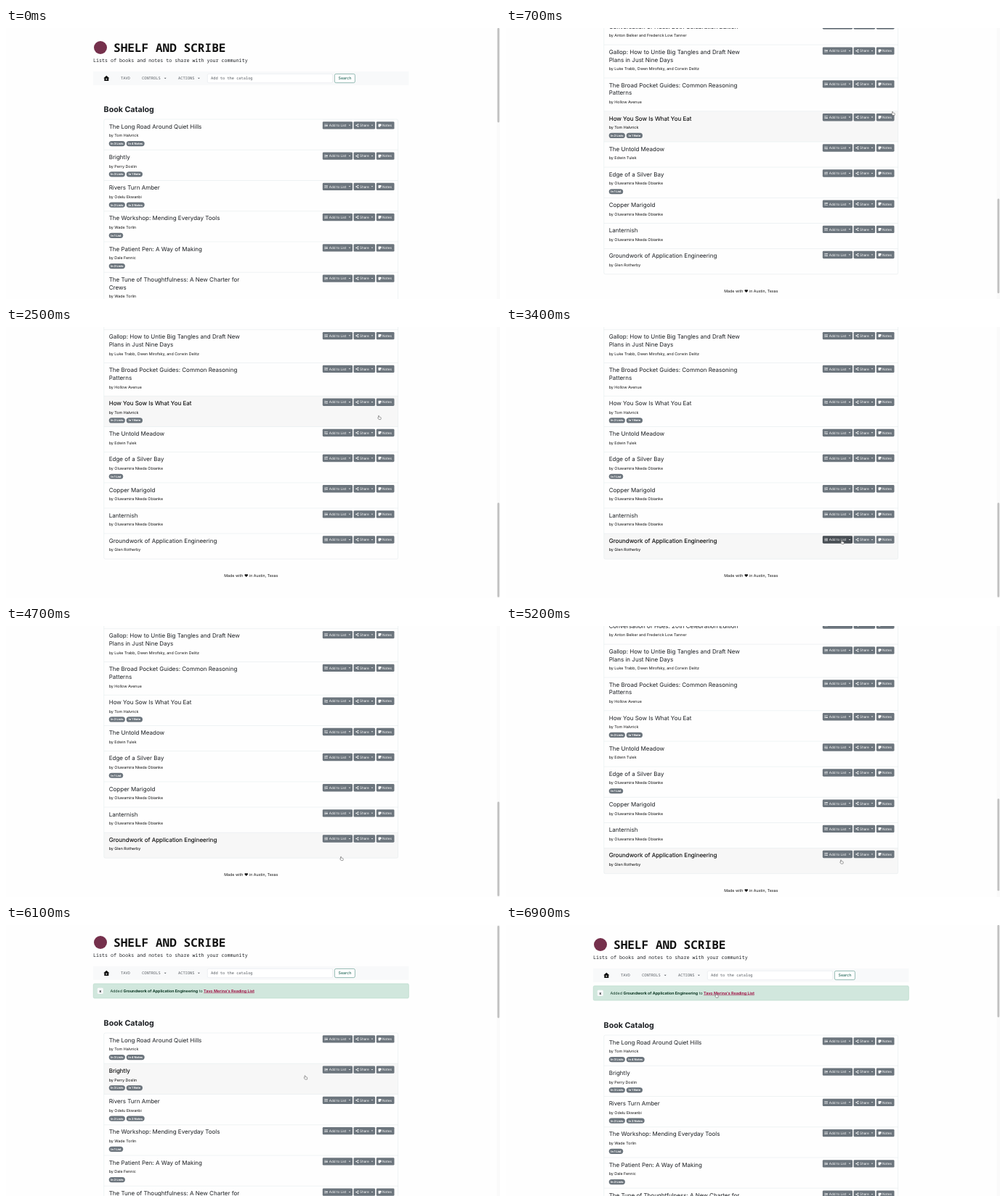
An HTML page that plays this animation: 680x374 px, repeating every 8 s.

```html
<!DOCTYPE html>
<html lang="en">
<head>
<meta charset="utf-8">
<title>Book Catalog</title>
<style>
html, body { margin: 0; width: 100%; height: 100%; overflow: hidden; background: #fefefe; }
svg { display: block; width: 100%; height: 100%; }
text { font-family: Inter, "DejaVu Sans", sans-serif; fill: #1c1f23; white-space: pre; text-rendering: geometricPrecision; }
.mono { font-family: "Noto Sans Mono", "DejaVu Sans Mono", monospace; }
.title { font-size: 8px; }
.by { font-size: 5.33px; fill: #111; }
.badge { font-size: 4px; font-weight: 700; fill: #fff; text-anchor: middle; }
.label { font-size: 4.67px; fill: #fff; }
.nav { font-size: 5.33px; fill: #555a60; }
.btn { fill: #6c757d; }
.btn.on { fill: #484e54; }
.bg { fill: none; }
.hover .bg { fill: #f7f7f7; }
.hover .title { fill: #000; stroke: #000; stroke-width: .07; }
.hover .by { fill: #000; }
.line { fill: none; stroke: #e4ebec; stroke-width: .6; }
</style>
</head>
<body>
<svg id="stage" viewBox="0 0 680 374" xmlns="http://www.w3.org/2000/svg">
  <defs>
    <g id="icoList" fill="#fff">
      <path d="M0 -1.9h1v1h-1zM0 -.5h1v1h-1zM0 .9h1v1h-1zM1.5 -1.7h2.8v.6h-2.8zM1.5 -.3h2.8v.6h-2.8zM1.5 1.1h2.8v.6h-2.8z"/>
    </g>
    <g id="icoShare" fill="#fff" stroke="#fff" stroke-width=".5">
      <path d="M3.2 -1.4L.9 0L3.2 1.4" fill="none"/>
      <circle cx="3.3" cy="-1.4" r=".6"/><circle cx=".9" cy="0" r=".6"/><circle cx="3.3" cy="1.4" r=".6"/>
    </g>
    <path id="icoNote" fill="#fff" d="M.4 -2h3.2q.4 0 .4 .4v2.1h-1.5v1.5h-2.1q-.4 0 -.4 -.4v-3.2q0 -.4 .4 -.4zM3 2v-1h1z"/>
  </defs>
  <g id="page">
    <circle cx="130" cy="27" r="9" fill="#75304c"/>
    <text class="mono" x="148" y="32.8" font-size="16.1" font-weight="600" style="fill:#111">SHELF AND SCRIBE</text>
    <text class="mono" x="120" y="47" font-size="6.7" font-weight="500">Lists of books and notes to share with your community</text>
    <rect x="120" y="60" width="434.5" height="18.7" fill="#f8f9fa"/>
    <path d="M138.3 65.8l4 3.5h-1v3.6h-6v-3.6h-1z" fill="#111"/>
    <rect x="137.5" y="69.8" width="1.6" height="1.6" fill="#f8f9fa"/>
    <text class="mono nav" x="158" y="71.4">TAVO</text>
    <text class="mono nav" x="187" y="71.4">CONTROLS</text>
    <text class="mono nav" x="237" y="71.4">ACTIONS</text>
    <path d="M217.7 68.8h3l-1.5 1.5zM263.9 68.8h3l-1.5 1.5z" fill="#555a60"/>
    <rect x="277.3" y="63.3" width="172.5" height="12.4" rx="2" fill="#fff" stroke="#dee2e6" stroke-width=".5"/>
    <text class="mono nav" x="282" y="71.4">Add to the catalog</text>
    <rect x="452.4" y="63.4" width="28" height="12.2" rx="2" fill="#fff" stroke="#4f9183" stroke-width=".6"/>
    <text x="466.4" y="71.4" font-size="5.33" font-weight="500" text-anchor="middle" style="fill:#24695a">Search</text>
    <g id="alert">
      <rect x="120.2" y="83.9" width="434.2" height="20.2" rx="1.8" fill="#d1e7dd" stroke="#a9d0bf" stroke-width=".5"/>
      <rect x="125.8" y="89.7" width="8" height="8.4" rx="1.5" fill="#f8f9fa"/>
      <text class="mono" x="129.8" y="95.7" font-size="5" font-weight="700" text-anchor="middle">x</text>
      <text x="143.4" y="95.6" font-size="5.33" style="fill:#0a3622">Added <tspan font-weight="700">Groundwork of Application Engineering</tspan> to <tspan font-weight="700" fill="#a01848" text-decoration="underline">Tavo Merina's Reading List</tspan></text>
    </g>
    <g id="content">
      <text x="134.6" y="115.6" font-size="10.67" font-weight="700">Book Catalog</text>
    </g>
  </g>
  <rect x="675.5" width="4.5" height="374" fill="#fafafa"/>
  <rect id="thumb" x="676.4" width="2.8" rx="1.4" fill="#c1c1c1"/>
  <path id="hand" d="M-1.3 -2.6q.7 -.4 .9 .3v1.4l1.9 .4q.9 .2 .8 1l-.4 2.1h-2.7l-1.4 -1.9q-.3 -.6 .3 -.7l.4 .3v-2.3q0 -.4 .2 -.6z" fill="#fff" stroke="#555" stroke-width=".55"/>
</svg>
<script>
const LOOP = 8000, STEP = 100, VIEW = 374, LIST_TOP = 126, ALERT_H = 26, PAGE_H = 1063.5;
const LEFT = 134.8, WIDTH = 404.8;
const ADD_AT = 4900;

// title lines split by "|", author, number of lists, number of notes
const books = [
  ["The Long Road Around Quiet Hills", "Tom Halvrick", 3, 4],
  ["Brightly", "Perry Doslin", 3, 1],
  ["Rivers Turn Amber", "Odelu Ekwanbi", 2, 2],
  ["The Workshop: Mending Everyday Tools", "Wade Torlin", 1],
  ["The Patient Pen: A Way of Making", "Dale Fennic", 2],
  ["The Tune of Thoughtfulness: A New Charter for|Crews", "Wade Torlin", 1],
  ["Clear Musing: The Big Atlas of Daily Puzzles", "Bernard Hollisk and Maureen Tadley", 3],
  ["Growing Crews: Methods for Supervision and|Workshop Planning", "Elaine Porter Wickson", 2],
  ["Wondering in Layers", "Rosetta K. Farlows", 1],
  ["Stewardship: Six Essays in Harbor Affairs", "Leonard Passwick", 1],
  ["Narrow and Boundless Yards", "Colin R. Dreve"],
  ["Hearing What Walls Won't: The Surprising Ways|We Find Answers", "Paul E. Vrint", 1],
  ["Conversation of Hues: 20th Celebration Edition", "Anton Belker and Frederick Low Tanner"],
  ["Gallop: How to Untie Big Tangles and Draft New|Plans in Just Nine Days", "Luke Trabb, Owen Mirofsky, and Corwin Delitz"],
  ["The Broad Pocket Guides: Common Reasoning|Patterns", "Hollow Avenue"],
  ["How You Sow Is What You Eat", "Tom Halvrick", 2, 1],
  ["The Untold Meadow", "Edwin Tulek"],
  ["Edge of a Silver Bay", "Oluwamira Nkeda Obianke", 1],
  ["Copper Marigold", "Oluwamira Nkeda Obianke"],
  ["Lanternish", "Oluwamira Nkeda Obianke"],
  ["Groundwork of Application Engineering", "Glen Rotherby"]
];

const scrollKeys = [[100, 0], [200, 25], [300, 150], [400, 340], [500, 500], [600, 610], [700, 670], [800, 689.5],
  [4800, 689.5], [4900, 715.5], [5000, 714], [5100, 708], [5200, 694], [5300, 650], [5400, 590], [5500, 520],
  [5700, 365], [5800, 260], [5900, 150], [6000, 50], [6100, 3], [6200, 0]];
const handKeys = [[1500, 533, 118], [1600, 532, 119], [1900, 521, 122], [2100, 521, 122], [2500, 514, 125],
  [2600, 514, 125], [3000, 478, 290], [3100, 478, 290], [3400, 463, 297], [4000, 463, 297], [4700, 462, 321],
  [4800, 462, 321], [5200, 462, 325.5], [5700, 463, 283.5], [5800, 459, 278], [6100, 412.5, 210.5],
  [6200, 405, 203], [6300, 405, 203], [6900, 290, 97.5]];

const $ = id => document.getElementById(id);
const page = $("page"), content = $("content"), alertBox = $("alert"), thumb = $("thumb"), hand = $("hand");

function add(parent, tag, attrs, text) {
  const el = document.createElementNS("http://www.w3.org/2000/svg", tag);
  for (const k in attrs) el.setAttribute(k, attrs[k]);
  if (text) el.textContent = text;
  parent.appendChild(el);
  return el;
}

function badge(g, x, y, n, noun) {
  const many = n > 1, w = (noun === "List" ? 19.5 : 22.3) + (many ? 2.7 : 0);
  add(g, "rect", { class: "btn", x, y: y - 3.6, width: w, height: 7.2, rx: 3.6 });
  add(g, "text", { class: "badge", x: x + w / 2, y: y + 1.45 }, `In ${n} ${noun}${many ? "s" : ""}`);
  return x + w + 1.8;
}

function button(g, x, w, y, icon, textX, label, caretX) {
  const box = add(g, "rect", { class: "btn", x, y: y - 5.2, width: w, height: 10.4, rx: 1.4 });
  add(g, "use", { href: "#" + icon, x: x + 2.8, y });
  add(g, "text", { class: "label", x: textX, y: y + 1.7 }, label);
  if (caretX) add(g, "path", { d: `M${caretX - 1.3} ${y - .6}h2.6l-1.3 1.3z`, fill: "#fff" });
  return { box, x, w };
}

function buildRow(top, [title, author, lists, notes]) {
  const lines = title.split("|"), two = lines.length > 1;
  const h = two ? (lists ? 53 : 45.8) : (lists ? 42.25 : 35.1);
  const g = add(content, "g", {}), mid = top + 9.8, by = mid + (two ? 23.4 : 12.5);
  add(g, "rect", { class: "bg", x: LEFT, y: top, width: WIDTH, height: h });
  lines.forEach((s, i) => add(g, "text", { class: "title", x: 141.7, y: mid + 2.9 + i * 10.7 }, s));
  add(g, "text", { class: "by", x: 141.7, y: by + 1.95 }, "by " + author);
  if (lists) {
    const x = badge(g, 141.7, by + 11.3, lists, "List");
    if (notes) badge(g, x, by + 11.3, notes, "Note");
  }
  const y = mid - 1.4;
  const buttons = [
    button(g, 435.8, 41.2, y, "icoList", 444.7, "Add to List", 473),
    button(g, 478.5, 29.6, y, "icoShare", 487, "Share", 504),
    button(g, 509.8, 24.7, y, "icoNote", 518, "Notes")
  ];
  return { g, top, h, y, buttons };
}

let bottom = LIST_TOP;
const rows = books.map(b => {
  const row = buildRow(bottom, b);
  bottom += row.h;
  return row;
});
rows.slice(1).forEach(r => add(content, "path", { class: "line", d: `M${LEFT} ${r.top}h${WIDTH}` }));
add(content, "rect", { class: "line", x: LEFT, y: LIST_TOP, width: WIDTH, height: bottom - LIST_TOP, rx: 2 });
add(content, "text", { class: "by", x: 337.3, y: bottom + 25.2, "text-anchor": "middle" }, "Made with \u2665 in Austin, Texas");

function sample(keys, t) {
  if (t <= keys[0][0]) return keys[0].slice(1);
  for (let i = 1; i < keys.length; i++) {
    const [a, ...from] = keys[i - 1], [b, ...to] = keys[i];
    if (t <= b) return from.map((v, j) => v + (to[j] - v) * (t - a) / (b - a));
  }
  return keys[keys.length - 1].slice(1);
}

function draw(time) {
  const t = Math.floor(time / STEP) * STEP;
  const [scroll] = sample(scrollKeys, t), [x, y] = sample(handKeys, t);
  const added = t >= ADD_AT, shift = added ? ALERT_H : 0, total = PAGE_H + shift;
  const shown = t >= 200;

  page.setAttribute("transform", `translate(0 ${-scroll})`);
  content.setAttribute("transform", `translate(0 ${shift})`);
  alertBox.style.display = added ? "" : "none";
  thumb.setAttribute("y", scroll / total * VIEW);
  thumb.setAttribute("height", VIEW / total * VIEW - 1);
  hand.style.display = shown ? "" : "none";
  hand.setAttribute("transform", `translate(${x} ${y})`);

  const px = x - 1, py = y - 2.5 + scroll - shift;
  for (const r of rows) {
    const over = shown && px > LEFT && px < LEFT + WIDTH && py >= r.top && py < r.top + r.h;
    r.g.classList.toggle("hover", over);
    for (const b of r.buttons)
      b.box.classList.toggle("on", over && px > b.x && px < b.x + b.w && Math.abs(py - r.y) < 5.2);
  }
}

const start = performance.now();
function tick() {
  draw((performance.now() - start) % LOOP);
  requestAnimationFrame(tick);
}
tick();
</script>
</body>
</html>
```
